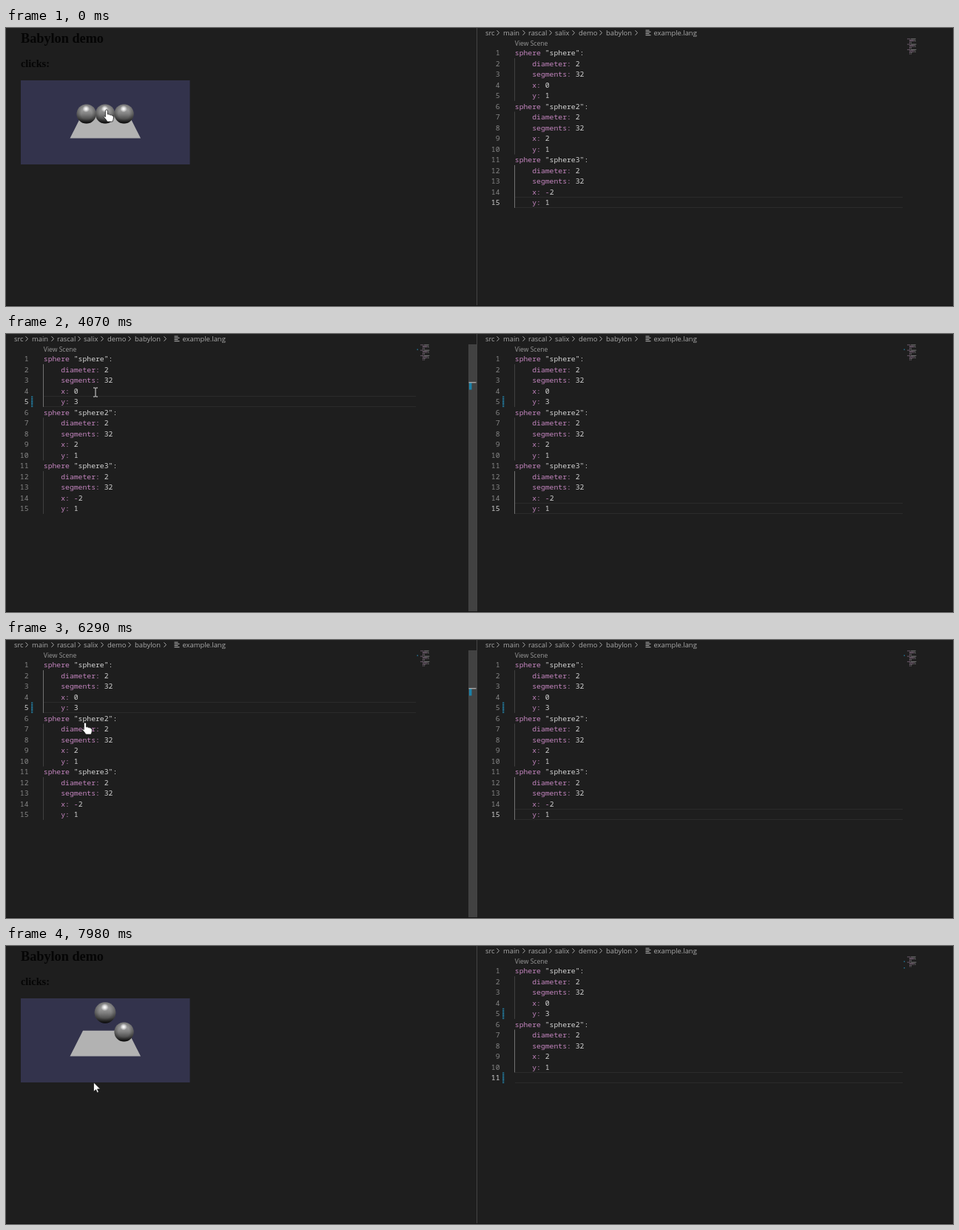
Recreate the animation shown at these times as an HTML page. Size 1280 by 377 pixels, loop 8 s.

```html
<!DOCTYPE html>
<html lang="en">
<head>
<meta charset="utf-8">
<title>Babylon demo</title>
<style>
html, body { margin: 0; width: 100%; height: 100%; overflow: hidden; background: #1e1e1e; }
svg { display: block; width: 1280px; height: 377px; }
text { white-space: pre; fill: #d4d4d4; }
.code, .num { font: 9.76px "Noto Sans Mono", monospace; }
.code .key { fill: #c586c0; }
.dots { fill: #53728f; }
.num { fill: #858585; text-anchor: end; }
.num.on { fill: #d0d0d0; }
.crumb { font: 9.4px "Open Sans", sans-serif; fill: #a9a9a9; }
.lens { font: 8.6px "Open Sans", sans-serif; fill: #999; }
.title { font: bold 18.24px "Liberation Serif", serif; fill: #050505; }
.sub { font: bold 14.3px "Liberation Serif", serif; fill: #050505; }
.icon { fill: none; stroke: #a9a9a9; }
#pointer path { display: none; fill: #fff; stroke: #111; stroke-width: .7; }
#pointer .beam { fill: none; stroke: #ddd; stroke-width: 1; }
</style>
</head>
<body>
<svg viewBox="0 0 1280 377">
  <defs>
    <linearGradient id="shade" x2="0" y2="1">
      <stop stop-color="#a8a8a8"/>
      <stop offset=".06" stop-color="#b0b0b0"/>
      <stop offset=".25" stop-color="#a0a0a0"/>
      <stop offset=".5" stop-color="#808080"/>
      <stop offset=".75" stop-color="#525252"/>
      <stop offset="1" stop-color="#0c0c0c"/>
    </linearGradient>
    <radialGradient id="rim">
      <stop offset=".55" stop-opacity="0"/>
      <stop offset="1" stop-opacity=".35"/>
    </radialGradient>
    <radialGradient id="shine">
      <stop stop-color="#fff"/>
      <stop offset=".35" stop-color="#fff" stop-opacity=".75"/>
      <stop offset="1" stop-color="#fff" stop-opacity="0"/>
    </radialGradient>
  </defs>
  <g id="left"></g>
  <g id="right" transform="translate(637)"></g>
  <rect x="636" width="1" height="377" fill="#444"/>
  <rect y="376" width="1280" height="1" fill="#141414"/>
  <g id="pointer">
    <path class="arrow" d="M0 0V12.5L3 9.8 4.8 14 6.8 13.1 5 9H9Z"/>
    <path class="hand" d="M-1.6 9.5V1.4a1.5 1.5 0 0 1 3 0V6q3-.6 3.2 1 2.8-.6 3.2 1 1.6 0 1.6 1.8 0 3-1.4 6.2H1q-2-3.2-5-6.4.6-1.8 2.4-.1z"/>
    <path class="beam" d="M-3-6h2.2l.8.7.8-.7H3M0-5.3V5.3M-3 6h2.2l.8-.7.8.7H3"/>
  </g>
</svg>
<script>
const LOOP = 8000, TICK = 68;
const TEXT_X = 50.8, CHAR = 5.856, ROW = 14.5;
const el = id => document.getElementById(id);

// Each entry changes only the listed fields of the scene.
const timeline = [
  [0, { demo: true, page: 2, up: false, rows: 15, y: '1', cur: 5, sel: null, caret: false, marks: [], diff: [], bar: '#4f4f4f' }],
  [480, { demo: false }],
  [550, { sel: [1, 5] }],
  [680, { caret: true }],
  [1180, { caret: false }],
  [1730, { sel: null, cur: 4, caret: true, bar: '#424242' }],
  [1930, { marks: [4] }],
  [2130, { caret: false }],
  [2660, { caret: true }],
  [3120, { cur: 5, marks: [] }],
  [3410, { marks: [5, 10, 15] }],
  [3550, { y: '', marks: [] }],
  [3610, { y: '3' }],
  [3810, { diff: [5] }],
  [4070, { caret: false }],
  [4340, { demo: true }],
  [4930, { page: 0 }],
  [5000, { page: 1 }],
  [5070, { page: 2, up: true }],
  [6290, { demo: false }],
  [6360, { sel: [11, 15], cur: 15 }],
  [6630, { sel: null, rows: 11, cur: 11, caret: true }],
  [6760, { diff: [5, 11] }],
  [6890, { demo: true }]
];

// start, end, shape, from x, from y, to x, to y
const moves = [
  [0, 210, 'hand', 136, 111, 136, 111],
  [210, 340, 'hand', 136, 111, 136, 112],
  [1030, 1660, 'beam', 135, 109, 121, 79],
  [5680, 5950, 'arrow', 120, 90, 111, 105],
  [5950, 6090, 'hand', 111, 105, 107, 112],
  [6360, 6560, 'beam', 107, 127, 111, 174],
  [6630, 6820, 'beam', 112, 184, 119, 206],
  [6890, 6890, 'arrow', 121, 213, 121, 213],
  [7090, 7230, 'arrow', 121, 212, 121, 210],
  [7370, 7980, 'arrow', 121, 209, 118.5, 185]
];

const rect = (x, y, w, h, fill, extra = '') =>
  `<rect x="${x}" y="${y}" width="${w}" height="${h}" fill="${fill}" ${extra}/>`;
const label = (cls, x, y, body) => `<text class="${cls}" x="${x}" y="${y}">${body}</text>`;
const rowTop = row => 26.45 + ROW * (row - 1);
const rulerY = row => 12 + 10.6 * row;
const range = (a, b) => Array.from({ length: b - a + 1 }, (_, i) => a + i);
const each = (list, fn) => list.map(fn).join('');

function sourceLines(s) {
  const lines = [['sphere', 0, s.y], ['sphere2', 2, 1], ['sphere3', -2, 1]].flatMap(([name, x, y]) =>
    [`sphere "${name}":`, '    diameter: 2', '    segments: 32', `    x: ${x}`, `    y: ${y}`]);
  return s.rows === 15 ? lines : [...lines.slice(0, 10), ''];
}

function breadcrumb() {
  const parts = [['src', 11], ['main', 35], ['rascal', 69], ['salix', 105], ['demo', 137], ['babylon', 174]];
  const chevrons = each([28, 63, 99, 130, 167, 215], x => `<path class="icon" d="M${x - 1.5} 3.3l3 3.2-3 3.2"/>`);
  const file = each([5, 7, 5, 7], (w, i) => rect(227.5, 2.6 + 2.2 * i, w, 1, '#b5b5b5'));
  return each(parts, ([name, x]) => label('crumb', x, 10, name)) + chevrons + file + label('crumb', 238.5, 10, 'example.lang');
}

function guides(s) {
  const last = s.rows === 11 ? 10 : 15;
  const active = Math.ceil(Math.min(s.cur, last) / 5) - 1;
  return each(range(0, last / 5 - 1), b =>
    rect(50, rowTop(b * 5 + 2), 1, ROW * 4, b === active ? '#707070' : '#404040'));
}

function selection(lines, [a, b]) {
  return each(range(a, b), row => {
    const chars = lines[row - 1].length + (row < b);
    return rect(50.5, rowTop(row), chars * CHAR, ROW + .1, '#264f78', 'rx="2"');
  });
}

function minimap(s, lines, x) {
  const y = row => 14 + 1.45 * (row - 1);
  let out = '';
  if (s.sel) {
    const [a, b] = s.sel;
    out += rect(x, y(a), 65, 1.45 * (b - a), '#213f60') + rect(x, y(b), 6, 1.8, '#264f78');
  }
  lines.forEach((line, i) => {
    for (const word of line.matchAll(/\S+/g)) {
      const tone = /^"|\d/.test(word[0]) ? '#d4d4d4' : '#b795b4';
      out += rect(x + word.index * .73, y(i + 1) + .4, word[0].length * .73, .9, tone, 'opacity=".55"');
    }
  });
  return out + each(s.diff, row => rect(x - 4.5, y(row) + .6, 1.5, 1.3, '#2580a5'));
}

function codeLine(line, row, s) {
  const y = rowTop(row) + 10.8;
  const chosen = s.sel && row >= s.sel[0] && row <= s.sel[1];
  const dots = line.replace(/\S/g, '\u00a0').replace(/ /g, '·');
  const body = line
    .replace('-', '<tspan class="key">-</tspan>')
    .replace(/^(\s*)(\w+:?)/, '$1<tspan class="key">$2</tspan>');
  return (chosen ? label('code', TEXT_X, y, `<tspan class="dots">${dots}</tspan>`) : '') +
    label('code', TEXT_X, y, body) +
    label(row === s.cur ? 'num on' : 'num', 30.5, y, row);
}

function editor(s, lineEnd, mapX) {
  const lines = sourceLines(s);
  const caretX = Math.floor(TEXT_X + lines[s.cur - 1].length * CHAR);
  const current = s.sel ? '' : each([rowTop(s.cur), rowTop(s.cur) + ROW - 1], y =>
    rect(51, Math.round(y), lineEnd - 51, 1, '#2b2b2b'));
  return breadcrumb() + label('lens', 50.8, 24.3, 'View Scene') + current +
    (s.sel ? selection(lines, s.sel) : '') + guides(s) +
    each(s.marks, row => rect(TEXT_X + 7 * CHAR, rowTop(row), CHAR, ROW, '#4a4a4a')) +
    each(lines, (line, i) => codeLine(line, i + 1, s)) +
    each(s.diff, row => `<path d="M35.2 ${rowTop(row)}v${ROW}" stroke="#2487b0" stroke-width="2.2" stroke-dasharray="1.4 .8"/>`) +
    (s.caret ? rect(caretX, Math.floor(rowTop(s.cur)), 1, 15, '#d0d0d0') : '') +
    minimap(s, lines, mapX);
}

function ruler(s) {
  return rect(625, 14, 11, 363, s.bar) +
    each(s.diff, row => rect(626, rulerY(row) + 1, 3.5, 9.5, '#1b81a8')) +
    each(s.marks, row => rect(628, rulerY(row), 4.5, 11, '#959595')) +
    rect(625.5, rulerY(s.cur), 10, 1.4, '#a5a5a5');
}

function ball(x, y, r) {
  const disc = fill => `<circle cx="${x}" cy="${y}" r="${r}" fill="url(#${fill})"/>`;
  return disc('shade') + disc('rim') +
    `<circle cx="${x - .5}" cy="${y - .52 * r}" r="${r * .36}" fill="url(#shine)"/>`;
}

function demoPage(s) {
  if (!s.page) return '';
  const heading = label('title', 20, 20, 'Babylon demo') + label('sub', 20, 52.5, 'clicks:');
  if (s.page < 2) return heading;
  return heading + rect(20, 71, 228.5, 114, '#33334c') +
    '<path d="M104 114.7H164.5L182 149.5H86.5Z" fill="#b2b2b2"/>' +
    (s.rows === 15 ? ball(108.7, 116.5, 13.1) : '') +
    (s.up ? ball(134, 90.5, 14.3) : ball(134, 116.5, 13.1)) +
    ball(159.5, 116.5, 13.1);
}

let shown = -1;
function drawScene(t) {
  const count = timeline.filter(([at]) => at <= t).length;
  if (count === shown) return;
  shown = count;
  const s = Object.assign({}, ...timeline.slice(0, count).map(step => step[1]));
  const idle = { ...s, cur: s.rows, sel: null, caret: false, marks: [] };
  el('left').innerHTML = s.demo ? demoPage(s) : editor(s, 554, 560) + ruler(s);
  el('right').innerHTML = editor(idle, 575, 581);
}

function drawPointer(t) {
  const [start, end, shape, x0, y0, x1, y1] = moves.filter(m => m[0] <= t).pop();
  const steps = Math.max(1, Math.round((end - start) / TICK));
  const p = t >= end ? 1 : Math.min(1, Math.floor((t - start) / TICK) / steps);
  el('pointer').setAttribute('transform', `translate(${x0 + (x1 - x0) * p} ${y0 + (y1 - y0) * p})`);
  for (const path of el('pointer').children) {
    path.style.display = path.classList.contains(shape) ? 'inline' : 'none';
  }
}

const begin = performance.now();
function tick() {
  const t = (performance.now() - begin) % LOOP;
  drawScene(t);
  drawPointer(t);
  requestAnimationFrame(tick);
}
tick();
</script>
</body>
</html>
```
